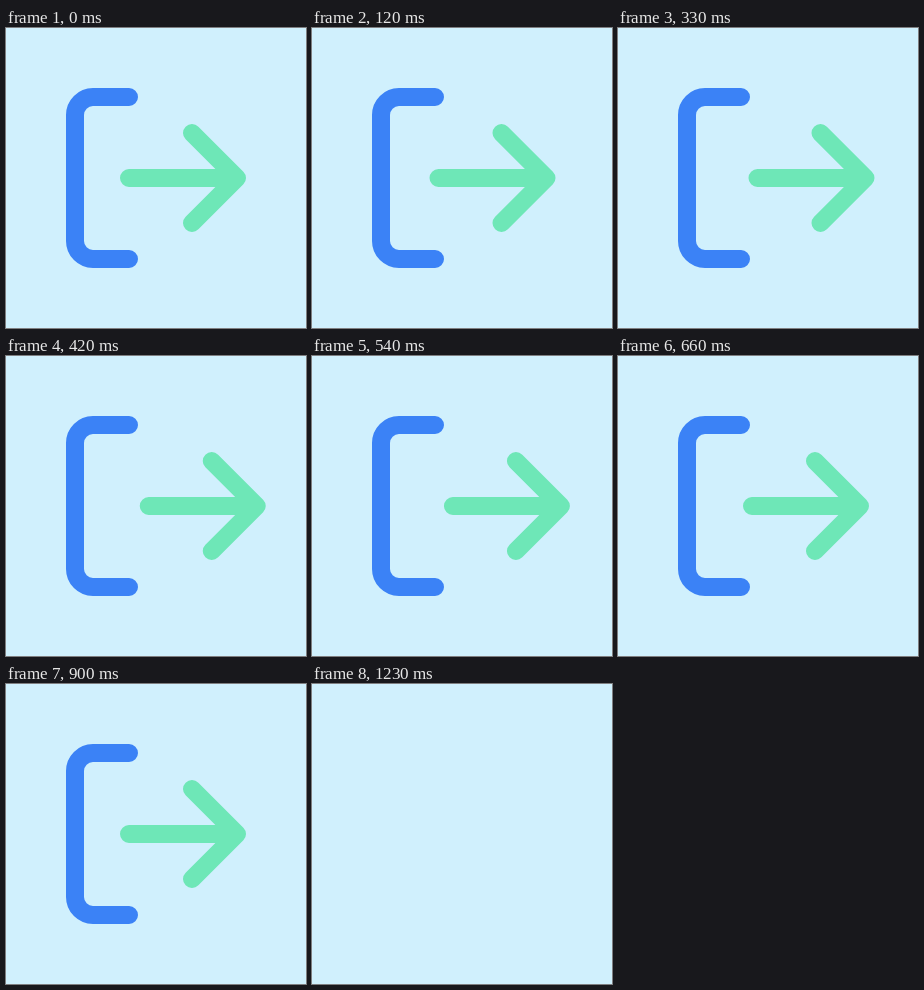
An HTML page for the animation above (1.26 s loop, 300 by 300 pixels).

```html
<!DOCTYPE html>
<html lang="en">
<head>
<meta charset="utf-8">
<title>Exit icon</title>
<style>
  html, body { margin: 0; width: 100%; height: 100%; overflow: hidden; background: #d0f0fd; }
  svg { display: block; width: 100%; height: 100%; }
</style>
</head>
<body>
<svg viewBox="0 0 300 300">
  <g id="icon" fill="none" stroke-width="18" stroke-linecap="round" stroke-linejoin="round">
    <path stroke="#3b82f6" d="M123 69H87A18 18 0 0 0 69 87V213A18 18 0 0 0 87 231H123"/>
    <path id="arrow" stroke="#6ee7b7" d="M186 105L231 150L186 195M231 150H123"/>
  </g>
</svg>
<script>
  const LOOP = 1260, STEP = 30, HALF = 450, BLANK = 1230, REACH = 20;
  const icon = document.getElementById('icon');
  const arrow = document.getElementById('arrow');
  const smooth = u => u * u * (3 - 2 * u);

  // Slide out and back, rest, then blink off for one step.
  function draw(ms) {
    const t = Math.floor((ms % LOOP) / STEP) * STEP;
    const u = Math.max(0, 1 - Math.abs(t - HALF) / HALF);
    arrow.setAttribute('transform', `translate(${REACH * smooth(u)} 0)`);
    icon.setAttribute('visibility', t < BLANK ? 'visible' : 'hidden');
  }

  const start = performance.now();
  function tick() {
    draw(performance.now() - start);
    requestAnimationFrame(tick);
  }
  tick();
</script>
</body>
</html>
```
